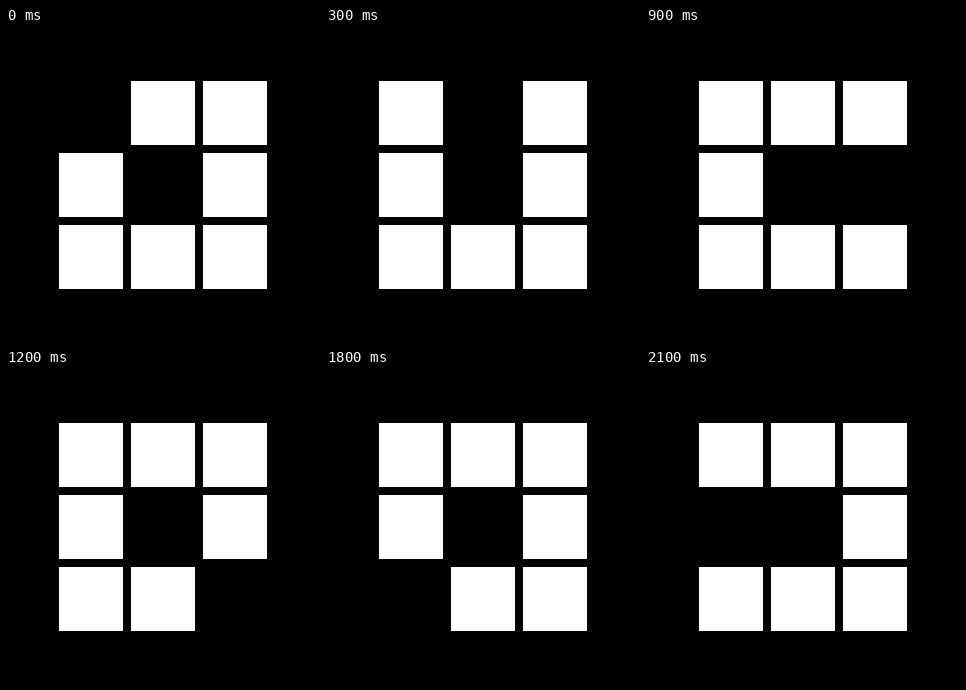
These frames come from a looping animation (314x314 px, 2.38 s). An HTML page with a canvas:

```html
<!DOCTYPE html>
<html lang="en">
<head>
<meta charset="utf-8">
<title>Square loader</title>
<style>
  html, body { margin: 0; width: 100%; height: 100%; overflow: hidden; background: #000; }
  canvas { display: block; }
</style>
</head>
<body>
<canvas id="stage" width="314" height="314"></canvas>
<script>
  const ctx = document.getElementById("stage").getContext("2d");
  const LOOP = 2380, STEP = 300;
  const START = 53, SIZE = 64, PITCH = 72;

  // Column and row of each tile, clockwise from the top left
  const ring = [[0, 0], [1, 0], [2, 0], [2, 1], [2, 2], [1, 2], [0, 2], [0, 1]];

  function draw(time) {
    const gap = Math.floor((time % LOOP) / STEP);
    ctx.fillStyle = "#000";
    ctx.fillRect(0, 0, 314, 314);
    ctx.fillStyle = "#fff";
    ring.forEach(([col, row], i) => {
      if (i !== gap) ctx.fillRect(START + col * PITCH, START + row * PITCH, SIZE, SIZE);
    });
  }

  const begin = performance.now();
  function tick() {
    draw(performance.now() - begin);
    requestAnimationFrame(tick);
  }
  tick();
</script>
</body>
</html>
```
